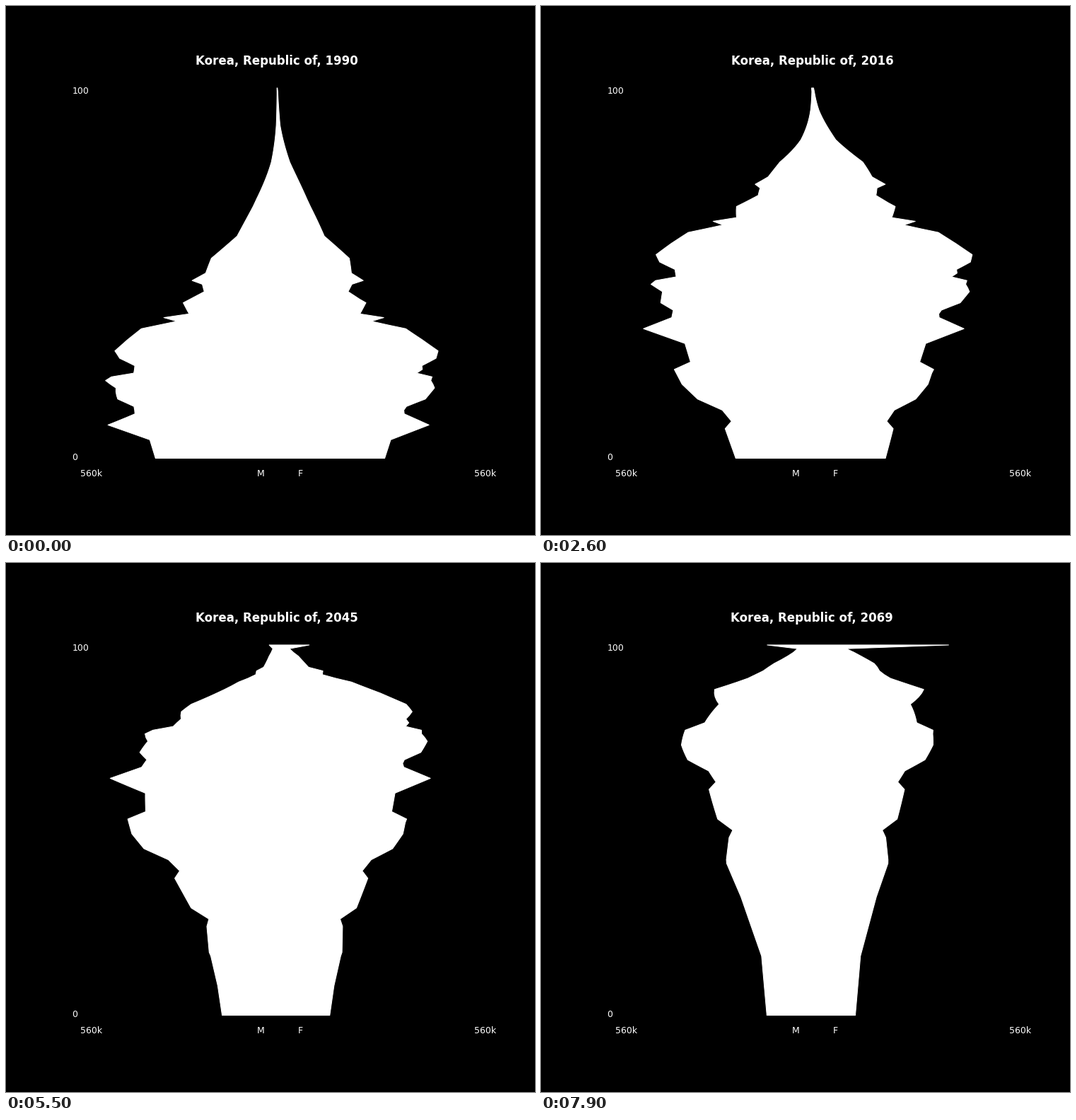
Write a matplotlib script that moves like this. It is 748 px wide and 748 px high and loops after 8 s.

```python
import numpy as np
import matplotlib.pyplot as plt
from matplotlib.animation import FuncAnimation

SIZE, DPI = 748, 100
LEFT, RIGHT = 0.125 * SIZE, 0.9 * SIZE
MID, HALF = (LEFT + RIGHT) / 2, (RIGHT - LEFT) / 2
FLOOR, STEP = 639.54, 5.236     # y of age 0 and pixels per year of age
YEARS = np.arange(1990, 2070)
AGES = np.arange(100)

# Boys born per year, in px of half-width: booms, slumps and the long decline.
BOYS = [
    (1890, 12), (1900, 12), (1910, 24), (1920, 48), (1930, 69), (1936, 104),
    (1940, 109), (1942, 128), (1943, 112), (1945, 108), (1948, 137),
    (1951, 127), (1952, 163), (1953, 144), (1955, 194), (1958, 213),
    (1961, 230), (1963, 222), (1965, 198), (1967, 195), (1968, 224),
    (1969, 230), (1971, 213), (1974, 215), (1976, 197), (1978, 199),
    (1981, 239), (1985, 180), (1990, 172), (1992, 195), (1996, 184),
    (2000, 162), (2003, 127), (2006, 114), (2008, 123), (2016, 108),
    (2019, 86), (2021, 91), (2028, 95), (2037, 84), (2053, 71.5), (2069, 64)]

# Girls per boy.
GIRLS = [
    (1890, 1.2), (1910, 1.3), (1920, 1.12), (1936, 1.02), (1947, 0.92),
    (1954, 0.93), (1961, 0.99), (1966, 1.045), (1969, 0.945), (1971, 1.045),
    (1977, 0.905), (1993, 0.88), (2016, 0.96), (2069, 0.955)]

# Open group "100 and over", growing exponentially between these years.
OPEN_MEN = [(1990, 0.2), (2007, 0.3), (2033, 4.7), (2069, 63.5)]
OPEN_WOMEN = [(1990, 0.4), (2007, 0.6), (2033, 22), (2069, 193)]

year = YEARS[:, None]
birth = year - AGES


def through(points, x):
    return np.interp(x, *np.transpose(points))


def survival(mode, spread):
    """Gompertz curve: share of each generation still alive."""
    return np.exp(-np.exp((AGES - mode) / spread))


def arrivals(rate):
    """Steady immigration at ages 16 to 42, from 2016 on."""
    start = np.maximum(16, 2016 - birth)
    return rate * np.clip(np.minimum(AGES, 42) - start, 0, None)


def with_open(body, points):
    top = np.exp(np.interp(YEARS, *zip(*[(y, np.log(w)) for y, w in points])))
    return np.column_stack([body, top])


boys = through(BOYS, birth)
girls = boys * through(GIRLS, birth)

# Young men who move away before 2007.
leavers = 15 * np.exp(-((birth - 1971) / 5) ** 2) * np.clip((2007 - year) / 17, 0, 1)

alive_m = survival(np.clip(81 + 0.25 * (birth - 1930), 79, 93),
                   np.clip(13 - 0.15 * (birth - 1945), 9.2, 13))
alive_f = survival(np.clip(89 + 0.25 * (birth - 1930), 87, 96),
                   np.clip(12 - 0.13 * (birth - 1930), 7.2, 12))
men = with_open((boys + arrivals(1.05) + leavers) * alive_m, OPEN_MEN)
women = with_open((girls + arrivals(0.65)) * alive_f, OPEN_WOMEN)

plt.rcParams["font.family"] = "DejaVu Sans"
fig = plt.figure(figsize=(SIZE / DPI, SIZE / DPI), dpi=DPI, facecolor="black")
ax = fig.add_axes([0, 0, 1, 1])
ax.set(xlim=(0, SIZE), ylim=(SIZE, 0))
ax.axis("off")


def label(x, y, text, size=9, **style):
    return ax.text(x, y, text, color="white", fontsize=size, va="baseline", **style)


label(LEFT, 124, "100")
label(LEFT, 642, "0")
for pos, text in [(-0.96, "560k"), (-0.1, "M"), (0.1, "F"), (0.96, "560k")]:
    label(MID + pos * HALF, 665, text)
title = label(MID, 83, "", 12, weight="bold", ha="center")

heights = FLOOR - STEP * np.arange(101)
outline_y = np.r_[heights, heights[::-1]]
shape, = ax.fill([MID], [FLOOR], facecolor="white", edgecolor="white",
                 linewidth=0.75, joinstyle="round")


def draw(i):
    x = np.r_[MID - men[i], MID + women[i, ::-1]]
    shape.set_xy(np.column_stack([x, outline_y]))
    title.set_text(f"Korea, Republic of, {YEARS[i]}")
    return shape, title


anim = FuncAnimation(fig, draw, frames=len(YEARS), interval=100, repeat=True)
plt.show()
```
